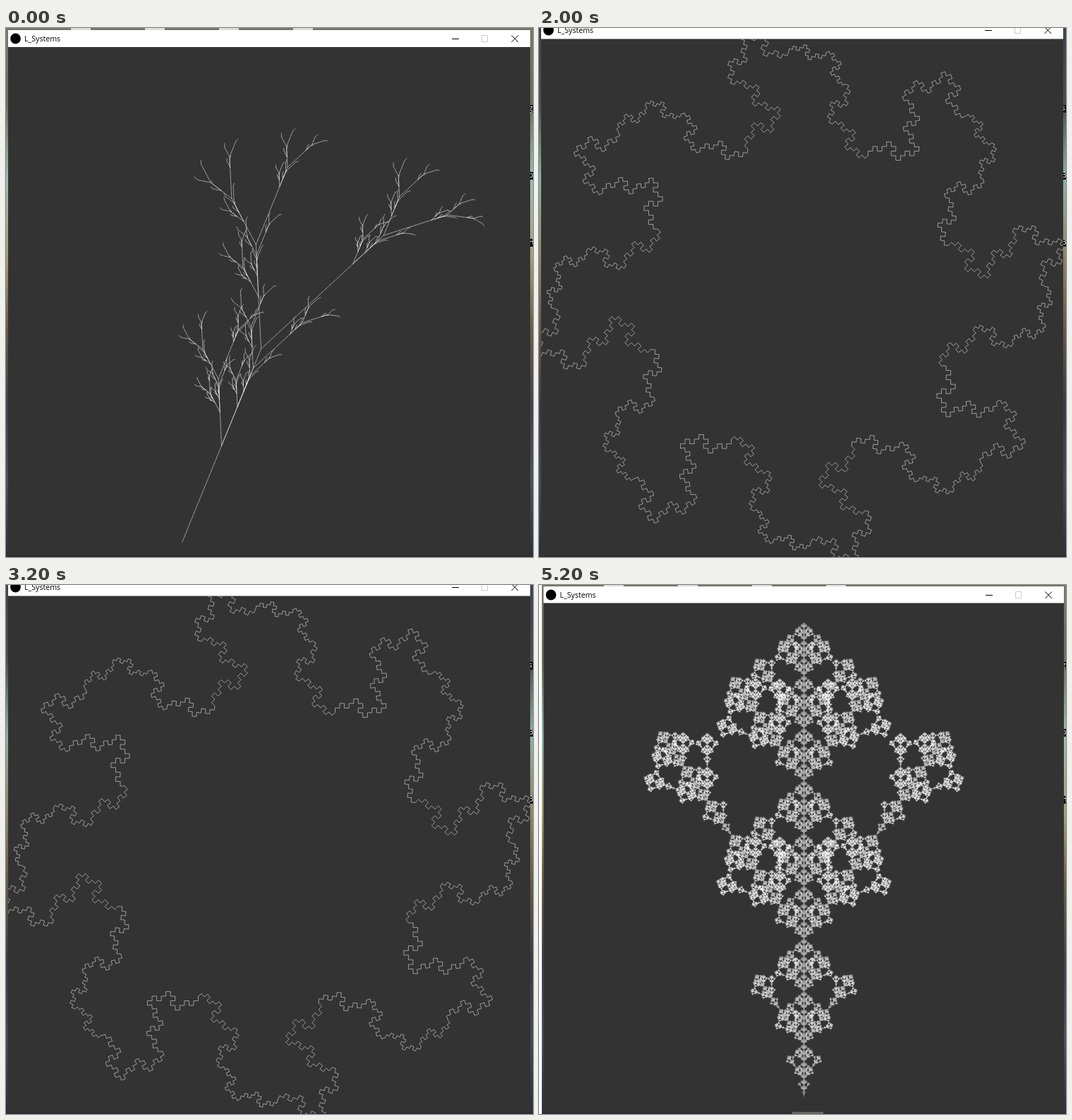
Write an HTML page with a canvas that moves like this. It is 747 by 750 pixels and loops after 6000 ms.

```html
<!DOCTYPE html>
<html>
<head>
<meta charset="utf-8">
<title>L_Systems</title>
<style>
  html, body { margin: 0; width: 100%; height: 100%; overflow: hidden; background: #333; }
  canvas { display: block; }
</style>
</head>
<body>
<canvas id="stage" width="747" height="750"></canvas>
<script>
const W = 747, H = 750, HOLD = 2000;
const rad = deg => deg * Math.PI / 180;

function expand(text, rules, times) {
  while (times--) text = text.replace(/[A-Z]/g, c => rules[c] || c);
  return text;
}

// Every bracket level shortens the step to 80 %.
function turtle(g, text, { x, y, heading, step, turn }) {
  const stack = [];
  for (const c of text) {
    if (c === 'F') {
      g.beginPath();
      g.moveTo(x, y);
      x += step * Math.sin(heading);
      y -= step * Math.cos(heading);
      g.lineTo(x, y);
      g.stroke();
    } else if (c === '+') heading -= turn;
    else if (c === '-') heading += turn;
    else if (c === '[') { stack.push([x, y, heading, step]); step *= 0.8; }
    else if (c === ']') [x, y, heading, step] = stack.pop();
  }
}

function plant(g) {
  const text = expand('X', { X: 'F+[[X]-X]-F[-FX]+X', F: 'FF' }, 5);
  turtle(g, text, { x: 249.7, y: 729, heading: rad(22.2), step: 9.25, turn: rad(25) });
}

function tree(g) {
  const text = expand('F', { F: 'F[+FF][-FF]F[-F][+F]F' }, 5);
  turtle(g, text, { x: 375.5, y: 725, heading: 0, step: 2.7645, turn: rad(35) });
}

// Replaces a side by a Z of three equal sides at right angles.
function zigzag(g, x, y, dx, dy, depth) {
  if (!depth) return g.lineTo(x + dx, y + dy);
  const u = (2 * dx + dy) / 5, v = (2 * dy - dx) / 5;
  zigzag(g, x, y, u, v, depth - 1);
  zigzag(g, x + u, y + v, -v, u, depth - 1);
  zigzag(g, x + u - v, y + v + u, u, v, depth - 1);
}

// One eighth of the outline, relative to its centre.
const bay = [[46, -246], [97, -201], [169, -214], [148, -279], [200, -318], [235, -257], [272, -219], [260, -168]];

function island(g) {
  const corners = [];
  for (let k = 0; k < 8; k++) {
    const c = Math.cos(k * Math.PI / 4), s = Math.sin(k * Math.PI / 4);
    for (const [x, y] of bay) corners.push([369.5 + x * c - y * s, 382 + x * s + y * c]);
  }
  g.beginPath();
  g.moveTo(...corners[0]);
  corners.forEach(([x, y], i) => {
    const [nx, ny] = corners[(i + 1) % corners.length];
    zigzag(g, x, y, nx - x, ny - y, 3);
  });
  g.stroke();
}

function desktop(g, colours, labels) {
  const fill = g.createLinearGradient(0, 0, 0, H);
  colours.forEach((colour, i) => fill.addColorStop(i / (colours.length - 1), colour));
  g.fillStyle = fill;
  g.fillRect(0, 0, W, H);
  g.fillStyle = '#ddd';
  for (let i = 0; i < 4; i++) g.fillRect(92 + i * 105, 0, 28, 3);
  g.font = '10px "Open Sans", sans-serif';
  [...labels].forEach((text, i) => {
    const y = 117 + i * 95;
    g.fillStyle = '#111';
    g.fillRect(742, y - 8, 5, 11);
    g.fillStyle = '#fff';
    g.fillText(text, 741, y);
  });
}

function appWindow(g, left, right, top, bar) {
  const mid = top + 12, x = right - 743, y = Math.round(mid) + .5;
  g.fillStyle = '#333';
  g.fillRect(left, bar, right - left, H - bar);
  g.fillStyle = '#fff';
  g.fillRect(left, top, right - left, bar - top);
  g.fillStyle = '#000';
  g.beginPath();
  g.arc(left + 10.5, mid, 7.4, 0, 7);
  g.fill();
  g.font = '10.6px "Open Sans", sans-serif';
  g.fillText('L_Systems', left + 23, mid + 4);

  g.lineWidth = 1;
  g.strokeStyle = '#000';
  g.beginPath();
  g.moveTo(632 + x, y); g.lineTo(642 + x, y);
  g.moveTo(716.5 + x, y - 5); g.lineTo(726 + x, y + 4.5);
  g.moveTo(726 + x, y - 5); g.lineTo(716.5 + x, y + 4.5);
  g.stroke();
  g.strokeStyle = '#ccc';
  g.strokeRect(674.5 + x, y - 5, 8, 9);
}

function scene({ left, right, top, bar, colours, labels, draw, alpha, margin, patch }) {
  const canvas = document.createElement('canvas');
  canvas.width = W;
  canvas.height = H;
  const g = canvas.getContext('2d');
  desktop(g, colours, labels);
  if (margin) {
    g.fillStyle = '#fff';
    g.fillRect(0, 0, margin, H);
  }
  appWindow(g, left, right, top, bar);
  g.fillStyle = '#2a2b32';
  g.fillRect(left, 748.5, W, 1.5);
  if (patch) {
    g.fillStyle = '#666';
    g.fillRect(359, 747, 44, 3);
  }
  g.beginPath();
  g.rect(left, bar, right - left, H - bar);
  g.clip();
  g.strokeStyle = `rgba(255,255,255,${alpha})`;
  g.lineWidth = 0.925;
  g.lineCap = 'round';
  draw(g);
  return canvas;
}

const day = ['#77766a', '#6d705f', '#a0bcb0', '#a8a07c', '#6a5c48', '#40424e', '#4a525c', '#2c303e'];
const dusk = ['#3c444c', '#4a5050', '#8fb0a6', '#90866a', '#64584a', '#3c3a48', '#444a54', '#2c303e'];
const scenes = [
  { left: 3, right: 743, top: 3, bar: 27, colours: day, labels: 'gpH', draw: plant, alpha: 0.5 },
  { left: 3, right: 743, top: -9, bar: 15.5, colours: dusk, labels: 'sBB', draw: island, alpha: 0.55 },
  { left: 6.5, right: 744, top: 2, bar: 25.5, colours: day, labels: 'gpH', draw: tree, alpha: 0.45,
    margin: 4, patch: true }
].map(scene);

const stage = document.getElementById('stage').getContext('2d');
const start = performance.now();
function tick() {
  const time = performance.now() - start;
  stage.drawImage(scenes[Math.floor(time / HOLD) % scenes.length], 0, 0);
  requestAnimationFrame(tick);
}
tick();
</script>
</body>
</html>
```
